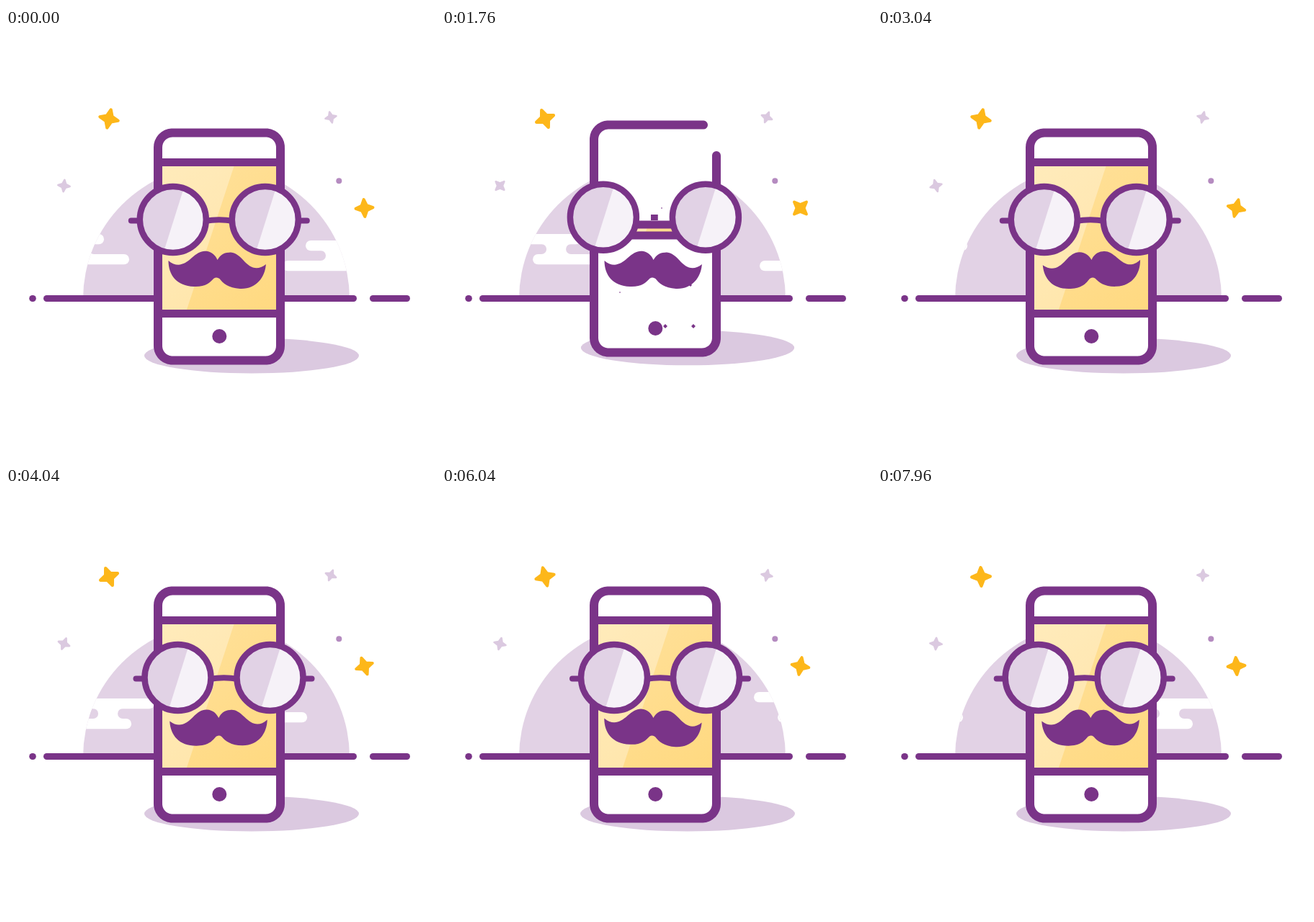
These frames come from a looping animation (597 px wide and 597 px high, 8 s). An HTML page with a canvas:

```html
<!DOCTYPE html>
<html>
<head>
<meta charset="utf-8">
<style>
  html, body { margin: 0; width: 100%; height: 100%; overflow: hidden; background: #fff; }
  canvas { display: block; width: 100vmin; height: 100vmin; }
</style>
</head>
<body>
<canvas id="stage"></canvas>
<script>
const SIZE = 597, LOOP = 8000, RESTART = 840, CX = 296;
const PURPLE = '#7a3488', SUN = '#e2d2e5', LILAC = '#dbc9e0', AMBER = '#fdb71a';
const canvas = document.getElementById('stage');
const ratio = window.devicePixelRatio || 1;
canvas.width = canvas.height = Math.round(SIZE * ratio);
const c = canvas.getContext('2d');

const lerp = (a, b, p) => a + (b - a) * p;
const clamp = p => Math.max(0, Math.min(1, p));
const ramp = (t, from, to) => clamp((t - from) / (to - from));
const smooth = p => p * p * (3 - 2 * p);
const easeOut = (p, power) => 1 - (1 - p) ** power;

// keys: [time, value] pairs
function track(keys, t, ease = smooth) {
  if (t <= keys[0][0]) return keys[0][1];
  for (let i = 1; i < keys.length; i++) {
    const [t0, v0] = keys[i - 1], [t1, v1] = keys[i];
    if (t < t1) return lerp(v0, v1, ease((t - t0) / (t1 - t0)));
  }
  return keys[keys.length - 1][1];
}

const POSES = [0, 1280, 1760, 3040, 4040, 6040, 7960];
const poses = values => values.map((v, i) => [POSES[i], v]);

const drift = [[0, 36], [839, 50], [840, 26], [1280, 57], [1760, 93],
  [3040, 201], [4040, 283], [6040, 433], [7960, 546]];
const phoneShift = [[840, 37], [1280, 35], [1720, -11], [1780, -11], [2140, 4], [2480, 0]];
const glance = [[0, .8], [839, 0], [3000, -.3], [3900, 7.5], [6120, 8], [7000, -8.3]];
const tilt = [[0, 2.6], [839, 2], [840, -16], [1280, -10.5], [1760, 2.6],
  [3040, -2.7], [4040, -.4], [6040, 3], [7960, -.4]];

const stars = [
  { x: 143, y: 126, r: 15, color: AMBER, turn: poses([12, -5, -22, 12, -22, -14, -2]) },
  { x: 497.5, y: 250, r: 14, color: AMBER, turn: poses([-4, 14, 45, 14, -20, 10, -4]) },
  { x: 451, y: 124, r: 9, color: LILAC, turn: poses([-14, 6, 22, 14, 22, 12, 2]) },
  { x: 80.5, y: 219, r: 9.5, color: LILAC, turn: poses([6, -20, 45, -16, 22, 14, 4]) }
];

// two points on each flight, with the half-diagonal at both
const sparks = [
  [303, 269, 5.5, 305, 250, 1], [249, 309, 3, 236, 299, 1], [257, 362, 3, 247, 367, 1],
  [332, 359, 3, 345, 357, 2], [307, 397, 10, 310, 414, 3], [337.5, 398, 10.5, 349, 414, 3]
];

const outline = document.createElementNS('http://www.w3.org/2000/svg', 'path');
outline.setAttribute('d', 'M296 461.5H231a20 20 0 0 1-20-20V165.500a20 20 0 0 1 20-20H361' +
  'a20 20 0 0 1 20 20V441.500a20 20 0 0 1-20 20Z');
const perimeter = outline.getTotalLength();

const moustache = new Path2D('M227 326C228 346 240 360.500 264 360.500C280 360.500 286 354 291 348' +
  'Q295 345 299 348C304 354 312 360.500 328 360.500C350 360.500 362 344 362.500 325' +
  'C350 336 340 330 331 321C323 313 317 310 311 311C303 311 298 316 295 322' +
  'C292 316 287 311 279 310.500C272 310 266 314 259 321C250 330 240 336 227 326Z');

function place(x, y, angle, scale, draw) {
  c.save();
  c.translate(x, y);
  c.rotate(angle * Math.PI / 180);
  c.scale(scale, scale);
  draw();
  c.restore();
}

function oval(x, y, rx, ry, color) {
  c.beginPath();
  c.ellipse(x, y, Math.max(0, rx), Math.max(0, ry), 0, 0, 7);
  c.fillStyle = color;
  c.fill();
}

function line(x1, x2, y, width, cap = 'round') {
  c.beginPath();
  c.moveTo(x1, y);
  c.lineTo(x2, y);
  c.strokeStyle = PURPLE;
  c.lineWidth = width;
  c.lineCap = cap;
  c.stroke();
}

function band(from, to, y) {
  c.beginPath();
  c.roundRect(from, y, to - from, 14.3, 7.15);
  c.fillStyle = '#fff';
  c.fill();
}

function cloud(x, y, top, bottom) {
  c.fillStyle = '#fff';
  c.fillRect(x - 7, y + 13.5, 41, 15);
  oval(x - 7, y + 21, 7, 7, SUN);
  oval(x + 34, y + 21, 7, 7, SUN);
  band(x + top[0], x + top[1], y);
  band(x + bottom[0], x + bottom[1], y + 28);
}

function drawSun(t, p) {
  c.save();
  c.beginPath();
  c.rect(0, 0, SIZE, 376);
  c.clip();
  c.beginPath();
  c.ellipse(292, 376, 185 * easeOut(p, 1.85), 185 * easeOut(p, 2.1), 0, 0, 7);
  c.fillStyle = SUN;
  c.fill();
  c.clip();
  const x = track(drift, t, p => p);
  for (let lap = 0; lap < 3; lap++) {
    const shift = x - lap * 563;
    cloud(shift + 52, 286, [-52, 48], [-19, 83]);
    cloud(shift + 408, 295, [-28, 78], [-60, 46]);
  }
  c.restore();
}

function drawGround(p) {
  const inner = easeOut(p, 1.2), outer = easeOut(p, 2.6);
  const at = (x, s) => CX + (x - CX) * s;
  if (p <= 0) return;
  line(at(56.5, inner), at(482.5, inner), 375.5, 9);
  line(at(36.7, outer), at(37.3, outer), 375.5, 9);
  line(at(509.5, outer), at(556.5, outer), 375.5, 9);
}

function drawStars(t, p) {
  const spread = easeOut(p, 1.45), grow = ramp(p, 0, .25);
  const at = (x, y) => [lerp(CX, x, spread), lerp(289, y, spread)];
  for (const s of stars) {
    place(...at(s.x, s.y), track(s.turn, t), s.r * grow, () => {
      c.beginPath();
      for (let i = 0; i < 8; i++) {
        const r = i % 2 ? .36 : .86, a = i * Math.PI / 4;
        c.lineTo(r * Math.sin(a), -r * Math.cos(a));
      }
      c.closePath();
      c.lineJoin = 'round';
      c.lineWidth = .28;
      c.fillStyle = c.strokeStyle = s.color;
      c.fill();
      c.stroke();
    });
  }
  oval(...at(462.3, 212.2), 4 * grow, 4 * grow, '#b58bc0');
}

function drawScreen(p) {
  if (p <= 0) return;
  const half = 105 * p, top = 291.5 - half;
  c.save();
  c.beginPath();
  c.rect(216.5, top, 159.5, half * 2);
  c.clip();
  const glow = c.createLinearGradient(216, 186, 376, 396);
  glow.addColorStop(0, '#ffe19c');
  glow.addColorStop(1, '#ffd980');
  c.fillStyle = glow;
  c.fillRect(211, 180, 170, 220);
  c.beginPath();
  c.moveTo(211, 180);
  c.lineTo(320.5, 180);
  c.lineTo(248, 400);
  c.lineTo(211, 400);
  c.fillStyle = 'rgba(255,255,255,.31)';
  c.fill();
  c.restore();
  line(211, 381, top, 11, 'butt');
  line(211, 381, 291.5 + half, 11, 'butt');
}

function drawPhone(u, shift) {
  const drawn = ramp(u, RESTART, 1815) * perimeter;
  if (drawn <= 0) return;
  const shade = smooth(ramp(u, 1350, 1780));
  c.save();
  c.translate(0, shift);
  oval(341, 455, 149 * shade, 24.5 * shade, LILAC);
  c.beginPath();
  const steps = 240;
  for (let i = 0; i <= steps; i++) {
    const d = drawn * (i / steps - .395);
    const point = outline.getPointAtLength((d + perimeter) % perimeter);
    c.lineTo(point.x, point.y);
  }
  if (drawn >= perimeter) c.closePath();
  c.fillStyle = '#fff';
  c.fill();
  drawScreen(easeOut(ramp(u, 1740, 2200), 1.6));
  c.strokeStyle = PURPLE;
  c.lineWidth = 12;
  c.lineCap = c.lineJoin = 'round';
  // the outline again, above the screen
  c.stroke(trimmed(drawn));
  const button = 10 * ramp(u, 960, 1200);
  oval(296.3, 428, button, button, PURPLE);
  c.restore();
}

function trimmed(drawn) {
  const path = new Path2D();
  for (let i = 0; i <= 240; i++) {
    const d = drawn * (i / 240 - .395);
    const point = outline.getPointAtLength((d + perimeter) % perimeter);
    path.lineTo(point.x, point.y);
  }
  if (drawn >= perimeter) path.closePath();
  return path;
}

function drawMoustache(t, u) {
  const size = track([[900, 0], [1280, .96], [1500, 1.04], [1760, 1]], u);
  place(295, 291, track(tilt, t), 1, () => {
    c.translate(0, 44);
    c.scale(size, size);
    c.translate(-295, -335);
    c.fillStyle = PURPLE;
    c.fill(moustache);
  });
}

function drawLens(x, scale) {
  place(x, 266, 0, scale, () => {
    oval(0, 0, 46, 46, '#e1d2e5');
    c.save();
    c.clip();
    c.beginPath();
    c.moveTo(17, -50);
    c.lineTo(60, -50);
    c.lineTo(60, 50);
    c.lineTo(-14.5, 50);
    c.fillStyle = '#f6f2f8';
    c.fill();
    c.restore();
    c.beginPath();
    c.arc(0, 0, 46, 0, 7);
    c.strokeStyle = PURPLE;
    c.lineWidth = 8.5;
    c.stroke();
  });
}

function drawGlasses(t, u, shift) {
  const size = track([[1400, 0], [1680, 1.04], [1760, 1]], u);
  if (size <= 0) return;
  const gap = track([[1400, 40], [1740, 71], [1780, 71], [2000, 64]], u);
  const bridge = ramp(u, 1740, 1900), arms = smooth(ramp(u, 1800, 2000));
  const mid = 295 + track(glance, t);
  c.save();
  c.translate(mid, shift * .3);
  if (arms > 0) {
    for (const side of [-1, 1]) {
      line(side * lerp(gap + 44, 113, arms), side * lerp(gap + 44, 122, arms), 267.5, 8);
    }
  }
  if (bridge > 0) {
    c.save();
    c.beginPath();
    c.rect(-lerp(2, 24, bridge), 255, 2 * lerp(2, 24, bridge), 20);
    c.clip();
    c.beginPath();
    c.moveTo(-20, 268);
    c.quadraticCurveTo(0, 264.5, 20, 268);
    c.strokeStyle = PURPLE;
    c.lineWidth = 8;
    c.stroke();
    c.restore();
  }
  drawLens(-gap, size);
  drawLens(gap, size);
  c.restore();
}

function drawSparks(u) {
  if (u < 1050 || u > 1860) return;
  const early = ramp(u, 1050, 1280), late = (u - 1280) / 480;
  for (const [x1, y1, r1, x2, y2, r2] of sparks) {
    const settle = late > 0 ? easeOut(Math.min(late, 1), 1.5) : 0;
    const x = lerp(lerp(CX, x1, early), x2, settle);
    const y = lerp(lerp(333, y1, early), y2, settle);
    const r = late < 0 ? r1 * early : Math.max(0, lerp(r1, r2, late) * ramp(u, 1860, 1760));
    place(x, y, 45, r * Math.SQRT1_2, () => {
      c.fillStyle = PURPLE;
      c.fillRect(-1, -1, 2, 2);
    });
  }
}

function render(t) {
  const u = t < RESTART ? LOOP : t;
  const open = ramp(u, RESTART, 1740);
  const shift = track(phoneShift, u);
  c.setTransform(ratio, 0, 0, ratio, 0, 0);
  c.fillStyle = '#fff';
  c.fillRect(0, 0, SIZE, SIZE);
  drawSun(t, open);
  drawGround(open);
  drawStars(t, open);
  drawPhone(u, shift);
  drawSparks(u);
  drawMoustache(t, u);
  drawGlasses(t, u, shift);
}

const start = performance.now();
function frame() {
  render((performance.now() - start) % LOOP);
  requestAnimationFrame(frame);
}
frame();
</script>
</body>
</html>
```
